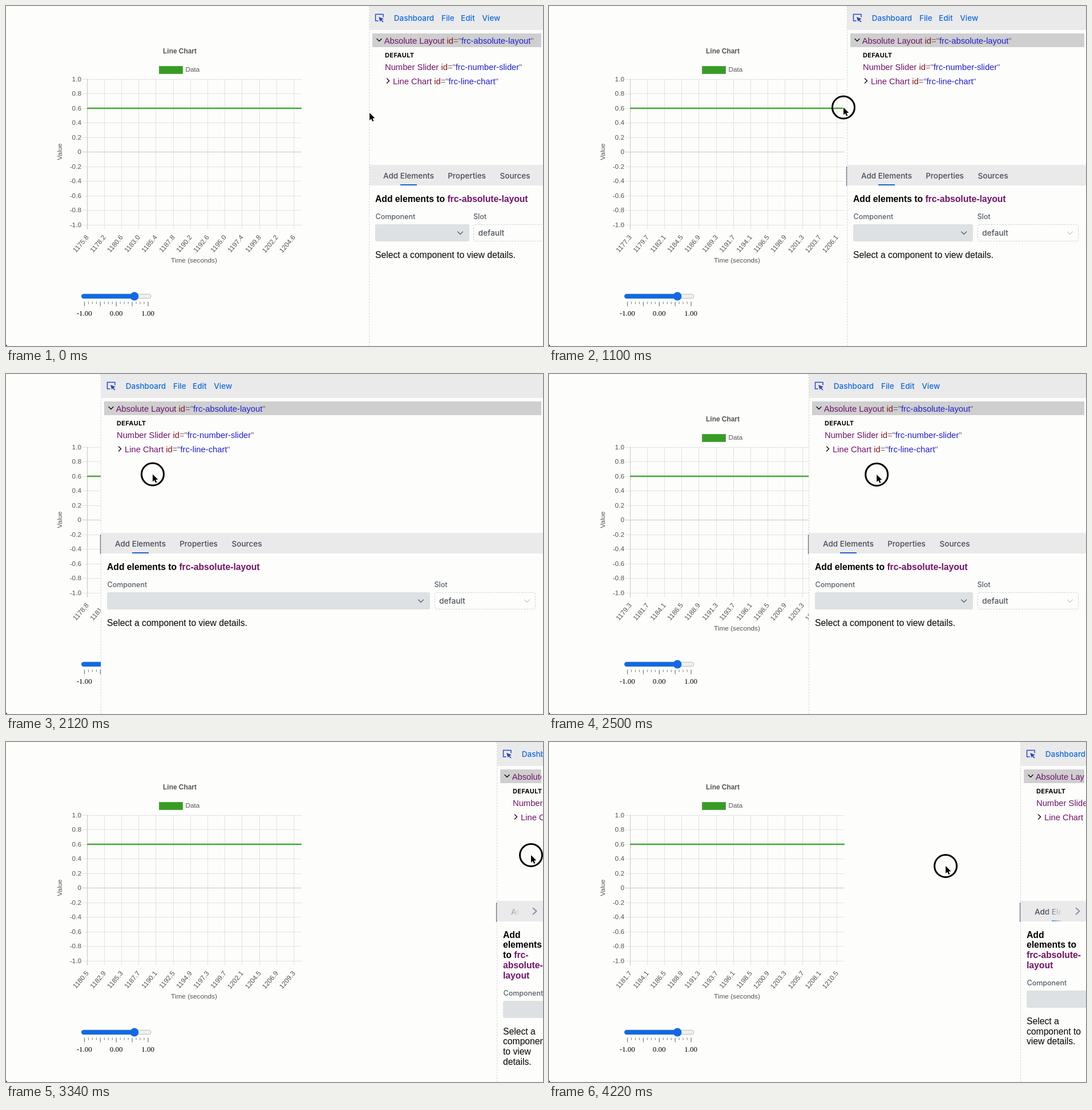
An HTML page with a canvas that plays this animation: 941x595 px, repeating every 4.24 s.

```html
<!DOCTYPE html>
<html lang="en">
<head>
<meta charset="utf-8">
<title>Dashboard builder</title>
<style>
  html, body { margin: 0; width: 100%; height: 100%; overflow: hidden; background: #fdfdfb; }
  #stage { position: relative; width: 941px; height: 595px; overflow: hidden; }
  canvas { position: absolute; left: 0; top: 0; }
  #panel { position: absolute; top: 0; height: 595px; overflow: hidden; background: #fdfdfb;
    font: 14.75px "Liberation Sans", Arial, sans-serif; box-sizing: border-box; }
  #panel div, #panel span.at, #panel svg { position: absolute; white-space: nowrap; }
  .ui { font-family: Inter, Roboto, sans-serif; font-weight: 500; font-size: 13.5px; }
  .edge { left: 0; top: 0; width: 0; height: 595px; border-left: 1px dashed #d6d6de; }
  .bar { left: 1px; right: 0; background: #eaeaeb; }
  .menu { top: 0; height: 42px; line-height: 43px; color: #0f6ae0; }
  .tabs { top: 278px; height: 36px; line-height: 39px; color: #454c56; overflow: hidden; }
  .tabs i { position: absolute; left: 54px; top: 34px; width: 29px; height: 2px; background: #1a66cc; }
  .row { left: 6px; right: 3px; top: 48px; height: 24px; line-height: 26px; background: #cfcfcf; overflow: hidden; }
  .row span.at { left: 20.7px; }
  .group { left: 28px; top: 79px; font-size: 11px; font-weight: 700; line-height: 14px; letter-spacing: .4px; }
  b.tag { font-weight: inherit; color: #701468; }
  .attr { color: #851414; } .val { color: #2020d4; } .sign { color: #75617d; }
  #panel .wrap { left: 11px; white-space: normal; font-size: 15.7px; line-height: 17.75px; color: #000; }
  .label { font-size: 12.5px; line-height: 16px; color: #565f6d; }
  .box { height: 29.5px; box-sizing: border-box; border-radius: 3px; line-height: 30px; color: #4e5662; }
  #slot { width: 177px; border: 1px dashed #d2d2da; line-height: 28px; padding-left: 7.5px; font-size: 13.7px; }
  #combo { background: #dde1e3; left: 10.5px; }
  svg { fill: none; stroke-linecap: round; stroke-linejoin: round; }
</style>
</head>
<body>
<div id="stage">
  <canvas id="chart" width="941" height="595"></canvas>
  <div id="panel">
    <div class="bar menu ui">
      <span class="at" style="left:42.8px">Dashboard</span><span class="at" style="left:126px">File</span>
      <span class="at" style="left:160px">Edit</span><span class="at" style="left:197.3px">View</span>
      <svg style="left:9px;top:13px" width="18" height="17" stroke="#2b45c8" stroke-width="1.5">
        <path d="M6 13H1.5V1.5H15V6"/><path d="M7 6L16 9.5L12.4 11L15.5 14.5L14 15.5L11 12L9.5 14.5Z" fill="#2b45c8" stroke="none"/>
      </svg>
    </div>
    <div class="row"><svg style="left:7px;top:8px" width="11" height="8" stroke="#111" stroke-width="1.5"><path d="M1 1.5L5 5.5L9 1.5"/></svg><span class="at" data-tag="Absolute Layout" data-id="frc-absolute-layout"></span></div>
    <div class="group ui">DEFAULT</div>
    <div style="left:28px;top:99px;line-height:17px" data-tag="Number Slider" data-id="frc-number-slider"></div>
    <svg style="left:30px;top:126px" width="8" height="11" stroke="#111" stroke-width="1.5"><path d="M1.5 1L5.5 5L1.5 9"/></svg>
    <div style="left:42px;top:123px;line-height:18px" data-tag="Line Chart" data-id="frc-line-chart"></div>
    <div class="bar" style="top:278px;height:36px"></div>
    <div class="bar tabs ui" id="tabs" style="background:none">
      <span class="at" style="left:24px">Add Elements</span><span class="at" style="left:137.2px">Properties</span>
      <span class="at" style="left:228.5px">Sources</span><i></i>
    </div>
    <svg id="more" style="top:289px" width="12" height="15" stroke="#858b96" stroke-width="1.8"><path d="M2.5 1.5L8.5 7L2.5 12.5"/></svg>
    <div class="wrap" id="head" style="top:328.5px"><strong>Add elements to <b class="tag">frc-absolute-layout</b></strong></div>
    <div class="label ui" id="comboLabel" style="left:11.5px">Component</div>
    <div class="label ui" id="slotLabel">Slot</div>
    <div class="box" id="combo"><svg style="right:10px;top:12px" width="12" height="8" stroke="#565f6d" stroke-width="1.3"><path d="M1.5 1L6 5.5L10.5 1"/></svg></div>
    <div class="box ui" id="slot">default<svg style="right:8px;top:11px" width="12" height="8" stroke="#cdcdd4" stroke-width="1.2"><path d="M1.5 1L6 5.5L10.5 1"/></svg></div>
    <div class="wrap" id="note">Select a component to view details.</div>
    <div class="edge"></div>
  </div>
  <canvas id="over" width="941" height="595"></canvas>
</div>
<script>
const $ = id => document.getElementById(id);
const chart = $('chart').getContext('2d'), over = $('over').getContext('2d');
const W = 941, H = 595, LOOP = 4240;
const SANS = '"Liberation Sans", Arial, sans-serif';
const SERIF = '"Liberation Serif", Times, serif';

for (const el of document.querySelectorAll('[data-tag]')) {
  const { tag, id } = el.dataset;
  el.innerHTML = `<b class="tag">${tag}</b> <span class="attr">id</span><span class="sign">="</span>` +
    `<span class="val">${id}</span><span class="sign">"</span>`;
}

// Monotone cubic through [step, value] points
function track(pts) {
  const last = pts.length - 1;
  const slope = i => (pts[i + 1][1] - pts[i][1]) / (pts[i + 1][0] - pts[i][0]);
  const tan = pts.map((p, i) => {
    if (i === 0 || i === last) return 0;
    const a = slope(i - 1), b = slope(i);
    return a * b <= 0 ? 0 : 2 * a * b / (a + b);
  });
  return n => {
    if (n >= pts[last][0]) return pts[last][1];
    let i = 0;
    while (n >= pts[i + 1][0]) i++;
    const [x0, y0] = pts[i], [x1, y1] = pts[i + 1], h = x1 - x0, u = (n - x0) / h, v = 1 - u;
    return v * v * (1 + 2 * u) * y0 + u * u * (3 - 2 * u) * y1 + h * u * v * (v * tan[i] - u * tan[i + 1]);
  };
}

const panelX = track([[0, 636], [7, 636], [23, 522], [34, 309], [44, 152], [46, 166], [58, 640], [61, 662], [71, 860], [75, 880], [82, 880], [91, 826]]);
const mouseX = track([[0, 637], [5, 637], [23, 516], [34, 305], [41, 152], [43, 166], [46, 257], [56, 645], [61, 660.5], [71, 920], [74, 932], [79, 930], [91, 695]]);
const mouseY = track([[0, 187], [5, 184], [23, 177.5], [34, 182.5], [46, 175.5], [61, 177.5], [71, 198], [91, 217]]);
const ringR = track([[0, 0], [4, 0], [7, 20], [57, 20], [61, 17.5], [63, 20], [91, 20]]);

function stepAt(t) {
  const u = t + 20;
  return 3 * Math.floor(u / 140) + Math.min(2, Math.floor(u % 140 / 20)) - 1;
}

function text(c, str, x, y, font, color, align = 'left', angle = 0) {
  c.save();
  c.translate(x, y);
  c.rotate(angle);
  c.font = font;
  c.fillStyle = color;
  c.textAlign = align;
  c.textBaseline = 'middle';
  c.fillText(str, 0, 0);
  c.restore();
}

function line(c, x0, y0, x1, y1, color, width = 1) {
  c.strokeStyle = color;
  c.lineWidth = width;
  c.beginPath();
  c.moveTo(x0, y0);
  c.lineTo(x1, y1);
  c.stroke();
}

function drawChart(n) {
  const c = chart, font = '11.8px ' + SANS, ink = '#545454', grid = '#e2e2e2', axis = '#c6c6c6';
  c.fillStyle = '#fdfdfb';
  c.fillRect(0, 0, W, H);
  text(c, 'Line Chart', 304.5, 79.5, 'bold 11.9px ' + SANS, ink, 'center');
  c.fillStyle = '#3a9a28';
  c.fillRect(268, 105, 42, 14);
  c.strokeStyle = '#4caf3c';
  c.lineWidth = 1;
  c.strokeRect(268.5, 105.5, 41, 13);
  text(c, 'Data', 314.5, 112, font, ink);

  for (let i = 0; i <= 10; i++) {
    const y = Math.round(127.5 + 25.5 * i) + .5, v = 1 - i / 5;
    line(c, 134, y, 518, y, i === 5 ? axis : grid);
    text(c, i === 5 ? '0' : v.toFixed(1), 132, y, font, ink, 'right');
  }
  const start = 1175.847 + .06485 * n;
  for (let i = 0; i <= 12; i++) {
    const x = Math.round(141.5 + 30.2 * i) + .5;
    line(c, x, 127.5, x, 391, i ? grid : axis);
    text(c, (start + 2.4 * i).toFixed(1), x + .5, 403, font, ink, 'right', -50 * Math.PI / 180);
  }
  line(c, 142, 179, 518, 179, '#3fa836', 2.5);
  text(c, 'Time (seconds)', 329.5, 446, font, ink, 'center');
  text(c, 'Value', 94.5, 255, font, ink, 'center', -Math.PI / 2);
  drawSlider(c);
  c.fillStyle = '#20206e';
  c.fillRect(0, 593, 1.5, 2);
}

function drawSlider(c) {
  const pill = (x, w, fill, stroke) => {
    c.beginPath();
    c.roundRect(x, 504.3, w, 7.2, 3.6);
    c.fillStyle = fill;
    c.fill();
    c.strokeStyle = stroke;
    c.lineWidth = 1;
    c.stroke();
  };
  pill(132.5, 121.5, '#efefec', '#bcbcbc');
  pill(132.5, 92, '#1469e0', '#1469e0');
  c.beginPath();
  c.arc(225, 508, 7.4, 0, 7);
  c.fill();
  for (let i = 0; i <= 16; i++) {
    const x = 137.5 + i * 6.97;
    line(c, x, 517.5, x, i % 4 ? 521.5 : 525.5, '#808080', i % 4 ? 1.1 : 1.3);
  }
  [-1, 0, 1].forEach((v, i) => text(c, v.toFixed(2), 137.3 + 55.7 * i, 539, '13px ' + SERIF, '#000', 'center'));
}

function layoutPanel(x) {
  const width = W - x, p = $('panel').style;
  p.left = x + 'px';
  p.width = width + 'px';
  for (const id of ['head', 'note']) $(id).style.width = width - 19.5 + 'px';
  const shift = (Math.round($('head').offsetHeight / 17.75) - 1) * 17.75;
  const comboW = Math.max(165, 743 - x - 10.5), slotX = 18 + comboW;
  const place = (id, top) => { $(id).style.top = top + shift + 'px'; };
  place('comboLabel', 361);
  place('slotLabel', 361);
  place('combo', 382);
  place('slot', 382);
  place('note', 426.5);
  $('combo').style.width = comboW + 'px';
  $('slot').style.left = slotX + 'px';
  $('slotLabel').style.left = slotX + 'px';
  const crowded = width < 300;
  $('more').style.display = crowded ? 'block' : 'none';
  $('more').style.left = width - 20 + 'px';
  const fade = crowded ? 'linear-gradient(to left, transparent 41px, #000 70px)' : 'none';
  $('tabs').style.webkitMaskImage = $('tabs').style.maskImage = fade;
}

function shape(c, pts, x, y) {
  c.beginPath();
  pts.forEach(([px, py]) => c.lineTo(x + px, y + py));
  c.closePath();
  c.lineJoin = 'round';
  c.strokeStyle = '#fff';
  c.lineWidth = 2;
  c.stroke();
  c.fillStyle = '#000';
  c.fill();
}

const ARROW = [[0, 0], [0, 13], [3, 10.3], [5.2, 15], [7.4, 14], [5.3, 9.5], [9.3, 9.3]];
const RESIZE = [[-8, 0], [-4, -3.5], [-4, -.7], [4, -.7], [4, -3.5], [8, 0], [4, 3.5], [4, .7], [-4, .7], [-4, 3.5]];

function drawOver(n, px) {
  const c = over, x = mouseX(n), y = mouseY(n), r = ringR(n);
  c.clearRect(0, 0, W, H);
  if (n >= 5) line(c, px - .5, 281, px - .5, 315, '#6a7280', 1.3);
  if (r > 1) {
    c.beginPath();
    c.arc(x, y, r - .5, 0, 7);
    c.strokeStyle = '#000';
    c.lineWidth = 3;
    c.stroke();
  }
  if (n >= 58 && n <= 62) shape(c, RESIZE, x + .5, y + 1);
  else shape(c, ARROW, x, y);
}

let shown = null;
const begin = performance.now();
function frame() {
  const n = stepAt((performance.now() - begin) % LOOP);
  if (n !== shown) {
    shown = n;
    const px = Math.round(panelX(n));
    drawChart(n);
    layoutPanel(px);
    drawOver(n, px);
  }
  requestAnimationFrame(frame);
}
frame();
</script>
</body>
</html>
```
